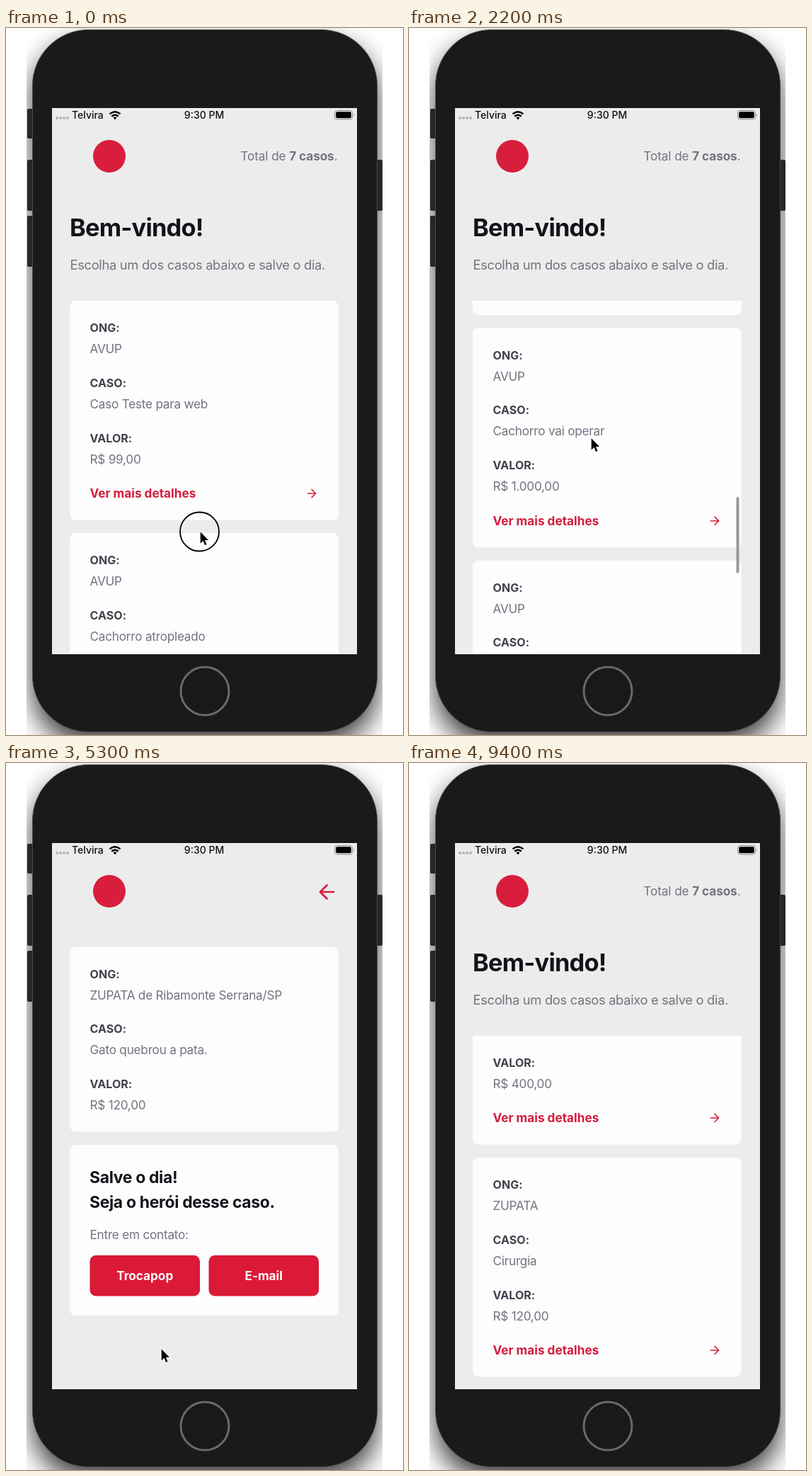
Animation, 561 px wide and 998 px high, one loop 9500 ms. Source, as an HTML page:

```html
<!DOCTYPE html>
<html lang="pt-BR">
<head>
<meta charset="utf-8">
<title>Casos</title>
<style>
html, body { margin: 0; width: 100%; height: 100%; overflow: hidden; background: #fff; }
svg { display: block; width: 561px; height: 998px; }
text { font-family: Inter, "Open Sans", sans-serif; }
.status { font-size: 14px; font-weight: 500; fill: #111; }
.title { font-size: 34.4px; font-weight: 700; fill: #13131a; letter-spacing: -.023em; }
.sub { font-size: 18.35px; fill: #737380; letter-spacing: -.018em; }
.label { font-size: 16px; font-weight: 700; fill: #41414d; letter-spacing: .004em; }
.value { font-size: 17.2px; fill: #737380; letter-spacing: -.014em; }
.link { font-size: 17.2px; font-weight: 700; fill: #d41c3c; }
.hero { font-size: 22.9px; font-weight: 700; fill: #13131a; letter-spacing: -.014em; }
.button { font-size: 17.2px; font-weight: 700; fill: #fff; text-anchor: middle; }
.end { text-anchor: end; letter-spacing: -.006em; }
.bold { font-weight: 700; }
.arrow { fill: none; stroke: #d41c3c; stroke-width: 2; stroke-linecap: round; stroke-linejoin: round; }
.paper { fill: #ececec; }
</style>
</head>
<body>
<svg viewBox="0 0 561 998">
  <defs>
    <clipPath id="photo"><rect x="29" width="503" height="998"/></clipPath>
    <clipPath id="screen"><rect x="65" y="113" width="431" height="771"/></clipPath>
    <clipPath id="list"><rect x="65" y="385" width="431" height="499"/></clipPath>
    <filter id="blur" x="-20%" y="-20%" width="140%" height="140%"><feGaussianBlur stdDeviation="18"/></filter>
  </defs>

  <g clip-path="url(#photo)">
    <rect x="37" y="20" width="488" height="992" rx="78" opacity=".75" filter="url(#blur)"/>
    <g id="keys" fill="#262626"></g>
    <rect x="37.5" y="2.5" width="487" height="991" rx="79" fill="#1a1a1a" stroke="#4a4a4a"/>
    <circle cx="281" cy="936" r="34" fill="#191919" stroke="#6a6a6a" stroke-width="3"/>
  </g>

  <g clip-path="url(#screen)">
    <rect class="paper" x="65" y="113" width="431" height="771"/>
    <g id="home"></g>
    <g id="detail"></g>
    <path d="M72 127h16" stroke="#b4b4b8" stroke-width="4" stroke-linecap="round" stroke-dasharray="0 5"/>
    <text class="status" x="93" y="127.7">Telvira</text>
    <path d="M146.5 121.4q7.5-6.4 15 0M149.3 124.8q4.7-4 9.4 0" fill="none" stroke="#000" stroke-width="2.5"/>
    <path d="M151.6 126.6q2.4-2 4.8 0L154 129.6z"/>
    <text class="status" x="280" y="127.7" text-anchor="middle">9:30 PM</text>
    <rect x="464.5" y="116.5" width="25" height="12.5" rx="3.2" fill="none" stroke="#8c8c90"/>
    <rect x="466.2" y="118.2" width="21.6" height="9.1" rx="1.8"/>
    <path d="M491 120.8q2 2 0 4z" fill="#8c8c90"/>
  </g>

  <g id="pointer">
    <circle id="ring" cx="-.5" cy="1" r="27.5" fill="none" stroke="#000" stroke-width="1.8"/>
    <path d="M.7 1.2V17.4L4.5 13.9 7 20.1 9.5 19 7 13H12z" stroke="#fff" stroke-width="2" paint-order="stroke"/>
  </g>
</svg>

<script>
const $ = id => document.getElementById(id);
const LOOP = 9500, STEP = 100, PITCH = 328, VIEW = 500, WIDTH = 431;
const LOADED = 1700, OPEN = 4620, CLOSE = 7800, HIDDEN = 8800;

const cases = [
  ['AVUP', 'Caso Teste para web', 'R$ 99,00'],
  ['AVUP', 'Cachorro atropleado', 'R$ 300,00'],
  ['AVUP', 'Ajude a gente 2', 'R$ 12,00'],
  ['AVUP', 'gato', 'R$ 77,00'],
  ['AVUP', 'Cachorro vai operar', 'R$ 1.000,00'],
  ['AVUP', 'Gato doente', 'R$ 400,00'],
  ['ZUPATA', 'Cirurgia', 'R$ 120,00']
];

const text = (cls, x, y, str) => `<text class="${cls}" x="${x}" y="${y}">${str}</text>`;
const box = (y, h) => `<rect x="90" y="${y}" width="380" height="${h}" rx="8.5" fill="#fdfdfd"/>`;
const key = (x, y, h) => `<rect x="${x}" y="${y}" width="12" height="${h}" rx="2"/>`;
const logo = '<circle cx="146" cy="181" r="23" fill="#d81e3c"/>';
const arrow = (x, y, scale, id = '') =>
  `<path ${id} class="arrow" transform="translate(${x} ${y}) scale(${scale})" d="M-7 0H7M0-7L7 0 0 7"/>`;

const fields = (y, values) => ['ONG:', 'CASO:', 'VALOR:'].map((name, i) =>
  text('label', 118.5, y + 44 + i * 77.8, name) +
  text('value', 118.5, y + 74 + i * 77.8, values[i])).join('');

const card = (values, i) => {
  const y = 385 + i * PITCH;
  return box(y, 309.5) + fields(y, values) + '<g class="more">' +
    text('link', 118.5, y + 278, 'Ver mais detalhes') + arrow(432, y + 272, .8) + '</g>';
};

const button = (x, name) =>
  `<rect x="${x}" y="695" width="155.5" height="57.5" rx="8.5" fill="#da1a36"/>` +
  text('button', x + 77.7, 729.5, name);

$('keys').innerHTML = key(30, 114, 42) + key(30, 186, 72) + key(30, 265, 72) + key(520, 186, 72);

$('home').innerHTML = logo +
  text('value end', 468.5, 187, 'Total de <tspan class="bold">7 casos</tspan>.') +
  text('title', 90, 293.5, 'Bem-vindo!') +
  text('sub', 90.5, 341, 'Escolha um dos casos abaixo e salve o dia.') +
  `<g clip-path="url(#list)"><g id="cards">${cases.map(card).join('')}</g>
   <rect id="bar" x="462.5" width="4" rx="2" fill="#98989b"/></g>`;

$('detail').innerHTML =
  '<rect class="paper" x="65" y="113" width="431" height="771"/>' + logo +
  arrow(453.5, 182, '-1.36 1.36', 'id="back"') +
  box(259.5, 261) + fields(259.5, ['ZUPATA de Ribamonte Serrana/SP', 'Gato quebrou a pata.', 'R$ 120,00']) +
  box(539, 241) +
  text('hero', 118, 593, 'Salve o dia!') + text('hero', 118, 628, 'Seja o herói desse caso.') +
  text('value', 118.5, 672, 'Entre em contato:') +
  button(118.5, 'Trocapop') + button(286.5, 'E-mail');

const lastLink = [...document.querySelectorAll('.more')].pop();

// Three swipes that fling the list, then two taps
const touches = [
  { down: 0, up: 300, x: 274, from: 710, to: 438, fling: 755 },
  { down: 1600, up: 1900, x: 257, from: 690, to: 578, fling: 422 },
  { down: 2600, up: 2900, x: 253, from: 720, to: 625, fling: 800 },
  { down: 4500, up: 4600, x: 219, from: 826, to: 826, fling: 0 },
  { down: 7500, up: 7700, x: 453, from: 181, to: 181, fling: 0 }
];
const [openTap, backTap] = touches.slice(3);

const ramp = (t, start, ms) => Math.min(1, Math.max(0, (t - start) / ms));
const mix = (a, b, p) => a + (b - a) * p;
const smoother = p => p * p * p * (p * (p * 6 - 15) + 10);
const easeOut = p => 1 - (1 - p) ** 4;

const dragged = (touch, t) => (touch.to - touch.from) * ramp(t, touch.down, touch.up - touch.down) ** 1.4;

// The pointer rests for half of each pause, then moves to the next touch
function pointerAt(t) {
  const i = touches.findLastIndex(touch => touch.down <= t);
  const now = touches[i], next = touches[i + 1] || now;
  const pause = (next.down - now.up) / 2;
  const p = pause > 0 ? easeOut(ramp(t, now.up + pause, pause)) : 0;
  return [mix(now.x, next.x, p), mix(now.from + dragged(now, t), next.from, p)];
}

// Each swipe adds its drag plus a decaying glide that the next touch stops
function scrollAt(t, max) {
  let sum = 0;
  touches.forEach((touch, i) => {
    const stop = touches[i + 1] ? touches[i + 1].down : LOOP;
    const ms = Math.max(0, Math.min(t, stop) - touch.up);
    sum += touch.fling * (1 - Math.exp(-ms / 500)) - dragged(touch, t);
  });
  const over = sum - max;
  return over > 0 ? max + over * Math.exp(-over / 50) : sum;
}

const pushed = t => smoother(ramp(t, OPEN, 450)) - smoother(ramp(t, CLOSE, 450));
const tapFade = (touch, t) => t < touch.down ? 1 : mix(.22, 1, ramp(t, touch.up + 100, 200));
const show = (el, on) => { el.style.display = on ? '' : 'none'; };
const move = (el, x, y) => el.setAttribute('transform', `translate(${x} ${y})`);

function draw(t) {
  move($('pointer'), ...pointerAt(t));
  show($('pointer'), t < HIDDEN);
  show($('ring'), touches.some(touch => t >= touch.down && t < touch.up));

  const height = PITCH * (t < LOADED ? 5 : cases.length);
  const max = height - VIEW;
  const scroll = scrollAt(t, max);
  move($('cards'), 0, -scroll);

  const over = Math.max(0, scroll - max);
  $('bar').setAttribute('y', 388 + 494 * (scroll - over) / height + over);
  $('bar').setAttribute('height', 494 * VIEW / height - over);
  show($('bar'), t > 0 && t < CLOSE);

  const p = pushed(t);
  move($('home'), -.3 * WIDTH * p, 0);
  move($('detail'), WIDTH * (1 - p), 0);
  show($('detail'), p > 0);
  lastLink.style.opacity = tapFade(openTap, t);
  $('back').style.opacity = tapFade(backTap, t);
}

const start = performance.now();
function tick() {
  const t = (performance.now() - start) % LOOP;
  draw(Math.floor(t / STEP) * STEP);
  requestAnimationFrame(tick);
}
tick();
</script>
</body>
</html>
```
